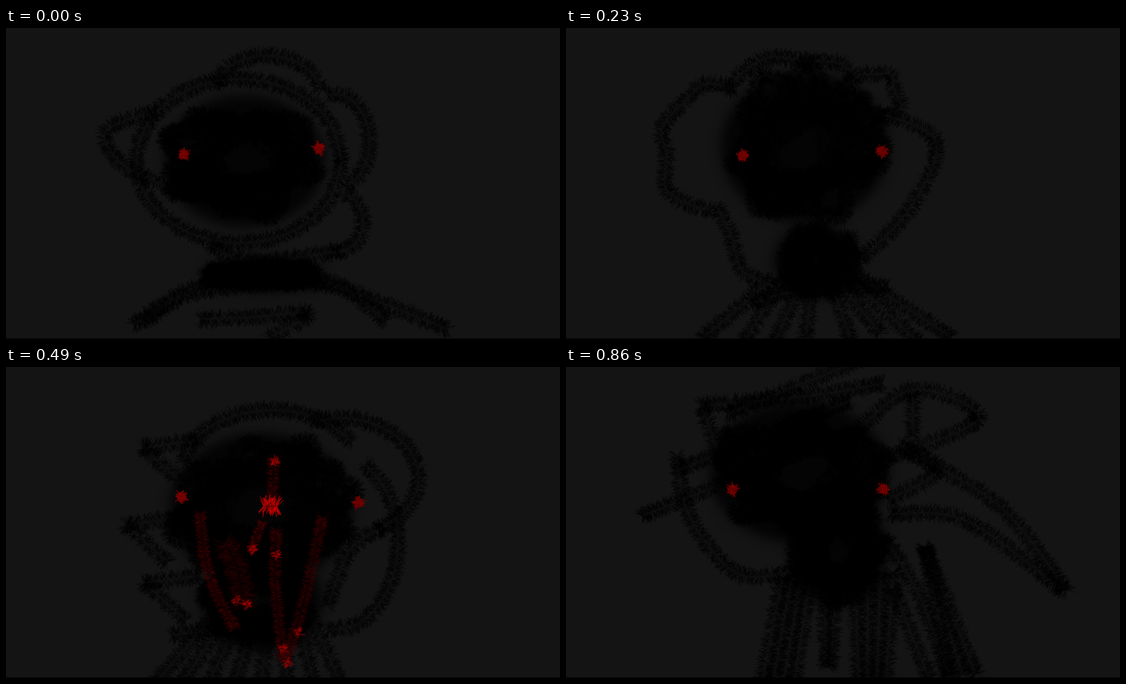
These frames come from a looping animation (998 by 561 pixels, 0.93 s). An HTML page with a canvas:

```html
<!DOCTYPE html>
<html lang="en">
<head>
<meta charset="utf-8">
<title>Scribbled shadow</title>
<style>
  html, body { margin: 0; width: 100%; height: 100%; overflow: hidden; background: #141414; }
  canvas { display: block; }
</style>
</head>
<body>
<canvas id="stage" width="998" height="561"></canvas>
<script>
const W = 998, H = 561, LOOP = 930, TURN = 2 * Math.PI;

function random(seed) {
  return () => {
    seed = (seed + 0x6D2B79F5) | 0;
    let t = Math.imul(seed ^ (seed >>> 15), 1 | seed);
    t = (t + Math.imul(t ^ (t >>> 7), 61 | t)) ^ t;
    return ((t ^ (t >>> 14)) >>> 0) / 4294967296;
  };
}

const parse = text => text.split(' ').map(p => p.split(',').map(Number));

// Catmull-Rom curve sampled at an even step
function curve(pts, gap = 3) {
  const out = [], at = i => pts[Math.max(0, Math.min(pts.length - 1, i))];
  for (let i = 0; i < pts.length - 1; i++) {
    const [a, b, c, d] = [at(i - 1), at(i), at(i + 1), at(i + 2)];
    const count = Math.max(1, Math.round(Math.hypot(c[0] - b[0], c[1] - b[1]) / gap));
    for (let k = 0; k < count; k++) {
      const t = k / count;
      out.push([0, 1].map(j => b[j] + t / 2 * (c[j] - a[j]
        + t * (2 * a[j] - 5 * b[j] + 4 * c[j] - d[j]
        + t * (3 * (b[j] - c[j]) + d[j] - a[j])))));
    }
  }
  out.push(at(pts.length));
  return out;
}

// Draws a pose with a furry brush; a wobbling pen redraws it more loosely
class Pen {
  constructor(g, seed, wobble) {
    this.g = g;
    this.rnd = random(seed);
    this.wobble = wobble;
  }

  jitter(n) {
    return n + (this.rnd() - .5) * this.wobble;
  }

  // short hairs laid across the path
  fur(path, r, alpha, red = 0) {
    const { g, rnd } = this;
    g.lineWidth = 1.3;
    g.globalAlpha = alpha;
    path.forEach(([x, y], i) => {
      const p = path[Math.max(0, i - 1)], q = path[Math.min(path.length - 1, i + 1)];
      const normal = Math.atan2(q[1] - p[1], q[0] - p[0]) + TURN / 4;
      g.strokeStyle = `rgb(${red * (.75 + .25 * rnd())},0,0)`;
      g.beginPath();
      for (let k = 0; k < 4; k++) {
        const a = normal + (rnd() - .5) * 1.8, c = r * Math.cos(a), s = r * Math.sin(a);
        const u = .5 + .55 * rnd(), v = .5 + .55 * rnd();
        g.moveTo(x - c * u, y - s * u);
        g.lineTo(x + c * v, y + s * v);
      }
      g.stroke();
    });
    g.globalAlpha = 1;
  }

  stroke(pts) {
    this.fur(curve(pts.map(p => p.map(n => this.jitter(n)))), 19, .42);
  }

  line(text) {
    this.stroke(parse(text));
  }

  // part of an ellipse, in degrees, clockwise from the right
  arc(cx, cy, rx, ry, from, to) {
    const n = Math.ceil((to - from) / 30), pts = [];
    for (let i = 0; i <= n; i++) {
      const a = (from + (to - from) * i / n) / 360 * TURN;
      pts.push([cx + rx * Math.cos(a), cy + ry * Math.sin(a)]);
    }
    this.stroke(pts);
  }

  // parallel strokes starting at the given tips
  spikes(angle, length, tips) {
    const a = angle / 360 * TURN;
    for (const [x, y] of parse(tips)) {
      this.stroke([[x, y], [x + length * Math.cos(a), y + length * Math.sin(a)]]);
    }
  }

  // strokes spread evenly between a top and a bottom edge
  fan(n, x1, x2, top, x3, x4, bottom) {
    for (let i = 0; i < n; i++) {
      const t = i / (n - 1);
      this.stroke([[x1 + (x2 - x1) * t, top], [x3 + (x4 - x3) * t, bottom]]);
    }
  }

  // dark oval filled by a wandering line
  scrawl(cx, cy, rx, ry) {
    const { g, rnd } = this, pts = [];
    g.filter = 'blur(10px)';
    g.fillStyle = 'rgba(0,0,0,.8)';
    g.beginPath();
    g.ellipse(cx, cy, rx * .85, ry * .85, 0, 0, TURN);
    g.fill();
    g.filter = 'none';
    for (let i = 0; i < 24; i++) {
      const a = i * 2.4 + rnd() * .5, d = .6 + .4 * rnd();
      pts.push([cx + (rx - 18) * d * Math.cos(a), cy + (ry - 18) * d * Math.sin(a)]);
    }
    this.stroke(pts);
  }

  red(text, level, r, alpha = .3) {
    if (!this.wobble) this.fur(curve(parse(text)), r, alpha, level);
  }

  eyes(...spots) {
    const { g, rnd } = this;
    for (const [x, y] of spots) {
      const cx = x + (rnd() - .5) * this.wobble / 3, cy = y + (rnd() - .5) * this.wobble / 3;
      g.lineWidth = 1.5;
      for (let i = 0; i < 60; i++) {
        const a = rnd() * TURN, b = a + TURN / 2 + rnd() - .5, r = 8 + 8 * rnd() * rnd();
        g.strokeStyle = `rgb(${85 + 45 * rnd()},0,0)`;
        g.beginPath();
        g.moveTo(cx + 8 * Math.cos(b), cy + 8 * Math.sin(b));
        g.lineTo(cx + r * Math.cos(a), cy + r * Math.sin(a));
        g.stroke();
      }
    }
  }
}

const poses = {
  knot(p) {
    p.scrawl(430, 240, 170, 140);
    p.scrawl(465, 445, 130, 38);
    p.arc(420, 240, 185, 148, 0, 360);
    p.arc(470, 125, 100, 75, 200, 350);
    p.arc(590, 205, 65, 86, -100, 70);
    p.arc(595, 350, 48, 54, -70, 90);
    p.line('270,150 190,178 182,212 240,265 400,320');
    p.line('370,392 440,422 600,403');
    p.line('230,535 360,462 540,450 660,490 795,543');
    p.line('250,528 350,475 580,465 685,528');
    p.line('350,525 440,522 545,515 475,558');
    p.eyes([320, 228], [564, 217]);
  },
  burst(p) {
    p.scrawl(430, 220, 195, 145);
    p.scrawl(450, 350, 130, 110);
    p.fan(9, 385, 550, 340, 325, 610, 575);
    p.fan(2, 325, 590, 390, 268, 750, 575);
    p.spikes(-27, 130, '0,78 78,148 138,228 162,268 112,356 238,438 310,108');
    p.spikes(162, 170, '600,50 772,124 825,231 712,280');
    p.spikes(145, 190, '772,124');
    p.spikes(42, 220, '70,-8 120,0');
    p.spikes(47, 100, '375,28 422,34');
    p.spikes(140, 140, '262,5');
    p.spikes(150, 80, '655,392');
    p.arc(320, 280, 100, 88, 95, 190);
    p.line('215,90 300,80 360,120');
    p.red('573,246 578,240', 96, 9);
    p.eyes([322, 223], [572, 218]);
  },
  grin(p) {
    p.scrawl(430, 215, 178, 160);
    p.scrawl(450, 420, 90, 80);
    p.fan(8, 370, 530, 455, 250, 700, 560);
    p.line('340,490 440,460 580,455');
    p.arc(275, 222, 103, 115, 95, 285);
    p.arc(420, 130, 120, 72, 190, 330);
    p.arc(550, 122, 45, 40, -110, 40);
    p.arc(370, 345, 88, 112, 100, 190);
    p.line('560,152 654,200 620,320 520,425 450,460');
    p.red('330,304 395,350 455,361 508,357 592,290', 225, 18, .6);
    p.red('330,304 395,350 455,361 508,357 592,290', 255, 13, .3);
    p.eyes([322, 231], [572, 219]);
  },
  tears(p) {
    p.scrawl(460, 255, 195, 160);
    p.scrawl(460, 420, 130, 110);
    p.fan(8, 390, 540, 430, 265, 605, 575);
    p.arc(480, 190, 165, 112, 190, 330);
    p.arc(600, 200, 143, 108, -110, 60);
    p.arc(590, 315, 116, 160, -60, 95);
    p.line('680,290 620,330 580,430');
    p.spikes(-8, 100, '247,146 217,285 250,390 298,484');
    p.spikes(42, 100, '247,146 217,285 250,390');
    p.red('350,265 356,330 375,400 412,470', 95, 14);
    p.red('486,295 485,390 500,530', 85, 14);
    p.red('570,272 540,410 505,525', 85, 14);
    p.red('395,318 415,360 430,425', 65, 27);
    p.red('482,165 480,240', 100, 14);
    p.red('462,280 442,330', 125, 11);
    for (const spot of parse('482,166 442,325 485,334 413,417 433,424 497,504 525,474 505,531')) {
      p.red(`${spot} ${spot[0] + 4},${spot[1] + 8}`, 235, 10, .45);
    }
    p.red('464,251 488,251', 255, 20, .7);
    p.eyes([316, 234], [636, 245]);
  },
  halo(p) {
    p.scrawl(470, 275, 178, 160);
    p.fan(6, 395, 500, 400, 375, 500, 575);
    p.arc(555, 115, 143, 107, 200, 430);
    p.arc(375, 290, 126, 165, 90, 260);
    p.arc(570, 320, 103, 112, -70, 100);
    p.arc(540, 300, 108, 110, -40, 90);
    p.spikes(152, 140, '735,184 545,116 590,152 472,116');
    p.spikes(-30, 140, '206,457 305,560');
    p.spikes(70, 120, '380,74');
    p.spikes(-130, 60, '615,438');
    p.eyes([323, 236], [603, 262]);
  },
  skull(p) {
    p.scrawl(450, 260, 160, 145);
    p.scrawl(435, 390, 80, 40);
    p.arc(460, 240, 168, 132, 170, 420);
    p.arc(590, 230, 42, 76, -80, 90);
    p.line('294,250 308,360 370,362 440,380');
    p.line('420,108 425,175');
    p.line('500,405 430,440 342,558');
    p.line('470,430 520,440 550,570');
    p.line('350,548 430,490 480,440 512,570');
    p.line('370,540 430,545 480,480');
    p.eyes([320, 242], [601, 239]);
  },
  claw(p) {
    p.scrawl(420, 190, 190, 150);
    p.scrawl(490, 330, 105, 120);
    p.fan(4, 390, 440, 380, 352, 410, 575);
    p.fan(2, 466, 485, 400, 469, 477, 540);
    p.fan(4, 520, 590, 370, 528, 575, 575);
    p.fan(3, 647, 647, 325, 690, 738, 555);
    p.spikes(-22, 330, '137,269 205,185 290,85');
    p.line('242,70 440,52 570,30');
    p.line('247,75 290,200');
    p.line('200,160 222,268 310,373 430,365');
    p.line('500,140 622,42 742,93 580,165');
    p.line('625,50 625,125');
    p.line('580,240 670,185 600,140');
    p.line('610,150 780,250 902,403');
    p.line('585,265 720,277 895,403');
    p.line('575,310 640,420 690,560');
    p.line('590,400 655,565');
    p.eyes([300, 221], [572, 220]);
  }
};

// start times of each pose; ~ marks a loose redraw
const steps = Object.entries({
  knot: '0 ~70 ~190 ~430', burst: '~100 130 ~160', grin: '~220 290 ~360',
  tears: '~460 490 ~560', halo: '~590 620', skull: '720 ~790', claw: '860'
}).flatMap(([name, times]) => times.split(' ').map(t => ({
  name, time: +t.replace('~', ''), loose: t[0] === '~'
}))).sort((a, b) => a.time - b.time);

function paint({ name, time, loose }) {
  const c = document.createElement('canvas'), g = c.getContext('2d');
  c.width = W;
  c.height = H;
  g.fillStyle = '#141414';
  g.fillRect(0, 0, W, H);
  poses[name](new Pen(g, time + 1, loose ? 24 : 0));
  g.fillStyle = '#000';
  g.fillRect(0, H - 1, W, 1);
  return c;
}

const pictures = steps.map(paint);
const stage = document.getElementById('stage').getContext('2d');
const begin = performance.now();
let shown = -1;

function draw() {
  const t = (performance.now() - begin) % LOOP;
  let i = steps.length - 1;
  while (i > 0 && steps[i].time > t) i--;
  if (i !== shown) stage.drawImage(pictures[shown = i], 0, 0);
  requestAnimationFrame(draw);
}
draw();
</script>
</body>
</html>
```
